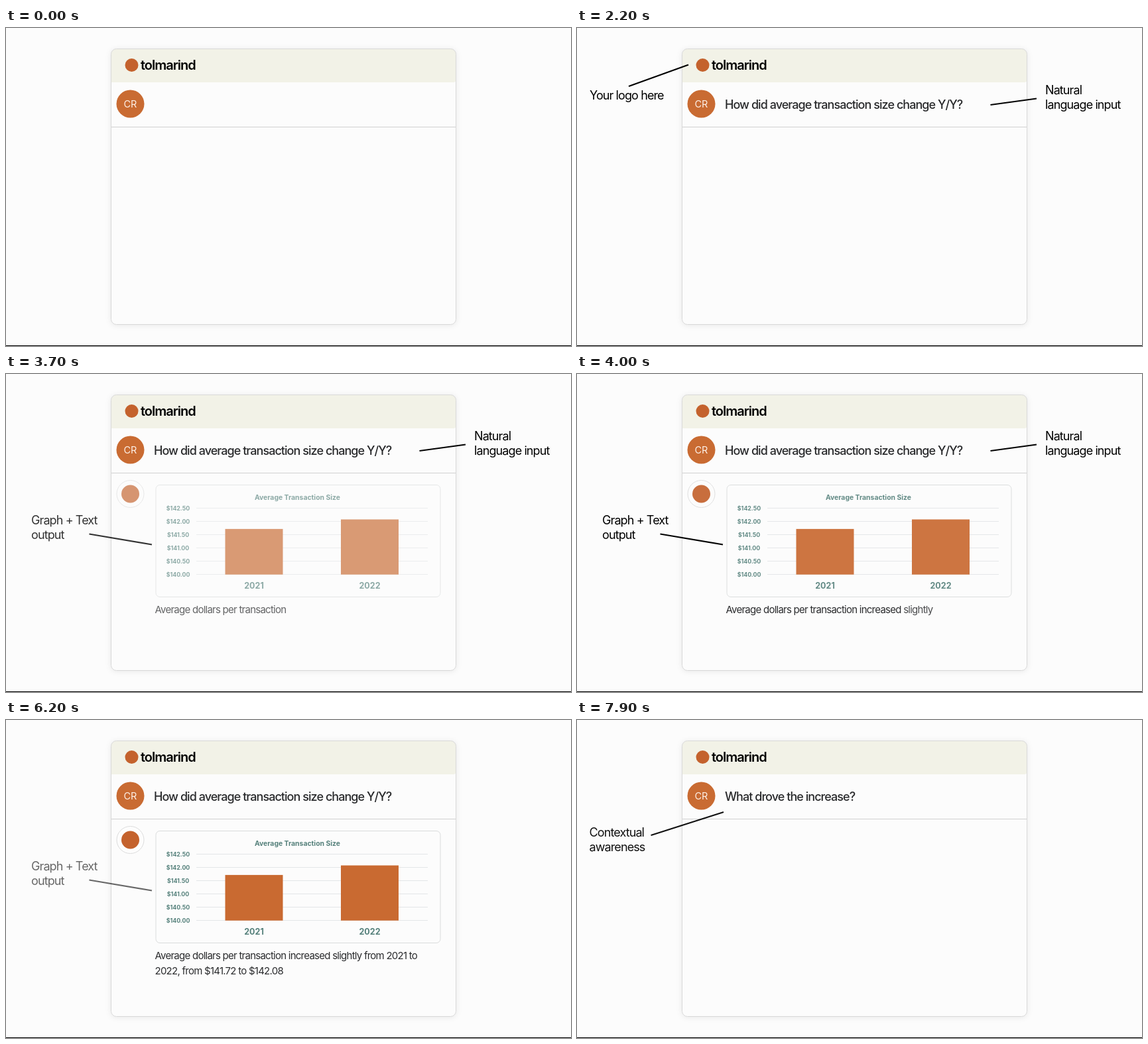
An HTML page that plays this animation: 852x480 px, repeating every 8000 ms.

```html
<!DOCTYPE html>
<html lang="en">
<head>
<meta charset="utf-8">
<title>Chat demo</title>
<style>
  html, body { margin: 0; width: 100%; height: 100%; overflow: hidden; background: #fcfcfc; }
  svg { display: block; width: 852px; height: 480px; }
  text { font-family: Inter, "Liberation Sans", sans-serif; white-space: pre; }
  .label { font-size: 18px; letter-spacing: -.05em; }
  .label line { stroke: #000; stroke-width: 2.2; }
  .ask { font-size: 18px; font-weight: 500; letter-spacing: -.053em; fill: #28292b; }
  .body { font-size: 15px; letter-spacing: -.05em; fill: #2b2c2e; }
  .chart text { font-weight: 700; fill: #55807b; text-anchor: middle; }
</style>
</head>
<body>
<svg id="stage" viewBox="0 0 852 480">
  <defs>
    <filter id="soft" x="-10%" y="-10%" width="120%" height="120%">
      <feDropShadow dx="0" dy="1" stdDeviation="4" flood-color="#000" flood-opacity=".09"/>
    </filter>
  </defs>
  <rect width="852" height="480" fill="#fcfcfc"/>
  <rect y="479" width="852" height="1"/>
  <rect x="158.5" y="31.5" width="520" height="416" rx="8" fill="#fcfcfc" filter="url(#soft)"/>
  <path d="M158.5 82V39.5a8 8 0 0 1 8-8h504a8 8 0 0 1 8 8V78a4 4 0 0 1-4 4z" fill="#f2f2e7"/>
  <rect x="158.5" y="31.5" width="520" height="416" rx="8" fill="none" stroke="#d9d9d9"/>
  <path d="M159 149.5H678" stroke="#d0d0d0"/>
  <circle cx="189.5" cy="56" r="10" fill="#c4622d"/>
  <text x="203" y="63" font-size="20" font-weight="600" letter-spacing="-1">tolmarind</text>
  <circle cx="187.5" cy="114.5" r="21" fill="#c96b32"/>
  <text x="187.5" y="119.8" font-size="14.5" fill="#fdf1e8" text-anchor="middle">CR</text>
</svg>
<script>
const LOOP = 8000, CUT = 6800, WORD_GAP = 180, WORD_FADE = 120;
const stage = document.getElementById('stage');
const fades = [], words = [];

const clamp = v => Math.max(0, Math.min(1, v));
const ramp = (t, from, to) => clamp((t - from) / (to - from));

function add(parent, tag, attrs, content = '') {
  const el = document.createElementNS('http://www.w3.org/2000/svg', tag);
  for (const key in attrs) el.setAttribute(key, attrs[key]);
  el.textContent = content;
  return parent.appendChild(el);
}

// Group that fades in over [a, b] and out over [c, d]
function fading(cls, a, b, c, d) {
  const el = add(stage, 'g', { class: cls });
  fades.push({ el, a, b, c, d });
  return el;
}

function label(lines, x, y, [x1, y1, x2, y2], times) {
  const g = fading('label', ...times);
  lines.forEach((s, i) => add(g, 'text', { x, y: y + 22 * i }, s));
  add(g, 'line', { x1, y1, x2, y2 });
}

// Lines of text revealed word by word
function typed(parent, cls, lines, x, y, start) {
  let n = 0;
  lines.forEach((s, i) => {
    const text = add(parent, 'text', { class: cls, x, y: y + 23 * i });
    for (const word of s.split(' '))
      words.push({ el: add(text, 'tspan', {}, word + ' '), start: start + WORD_GAP * n++ });
  });
}

typed(fading('', 0, 1, CUT - 1, CUT), 'ask',
  ['How did average transaction size change Y/Y?'], 223, 122, 260);
typed(fading('', CUT - 1, CUT, LOOP, LOOP + 1), 'ask',
  ['What drove the increase?'], 223, 122, CUT - 100);

const answer = fading('chart', 2900, 4100, CUT - 1, CUT);
add(answer, 'circle', { cx: 187.5, cy: 181, r: 20.5, fill: '#fdfdfd', stroke: '#dcdcdc' });
add(answer, 'circle', { cx: 187.5, cy: 181, r: 13.5, fill: '#c4622d' });
add(answer, 'rect', { x: 226, y: 167.5, width: 429, height: 169, rx: 6, fill: 'none', stroke: '#dadcdc' });
add(answer, 'text', { x: 439.5, y: 189.7, 'font-size': 10.4 }, 'Average Transaction Size');
for (let i = 0; i < 6; i++) {
  const y = 302.5 - 20 * i;
  add(answer, 'path', { d: `M287 ${y}H636`, stroke: '#e3e6e8' });
  add(answer, 'text', { x: 259.5, y: y + 3.2, 'font-size': 8.8 }, '$' + (140 + i / 2).toFixed(2));
}
[[2021, 141.72, 330.5], [2022, 142.08, 505]].forEach(([year, value, x]) => {
  const height = (value - 140) * 40;
  add(answer, 'rect', { x, y: 302.7 - height, width: 87, height, fill: '#c96a31' });
  add(answer, 'text', { x: x + 43.5, y: 323.5, 'font-size': 12.5 }, year);
});

typed(fading('', 2900, 4000, CUT - 1, CUT), 'body', [
  'Average dollars per transaction increased slightly from 2021 to',
  '2022, from $141.72 to $142.08'
], 224.5, 360.5, 3000);

label(['Your logo here'], 19, 108, [78, 88, 168, 55.5], [250, 1100, 2650, 3380]);
label(['Natural', 'language input'], 706, 100, [623.5, 116, 693, 106.5], [1000, 1800, 4250, 4950]);
label(['Graph + Text', 'output'], 38, 227, [125.5, 241.5, 220, 257.5], [2900, 3900, 5850, 6700]);
label(['Contextual', 'awareness'], 18.5, 176, [111.5, 174, 221, 139], [7100, 7960, LOOP, LOOP + 1]);

function draw(now) {
  const t = now % LOOP;
  for (const { el, a, b, c, d } of fades)
    el.setAttribute('opacity', ramp(t, a, b) * (1 - ramp(t, c, d)));
  for (const { el, start } of words)
    el.setAttribute('fill-opacity', ramp(t, start, start + WORD_FADE));
}

const begin = performance.now();
function tick() {
  draw(performance.now() - begin);
  requestAnimationFrame(tick);
}
tick();
</script>
</body>
</html>
```
